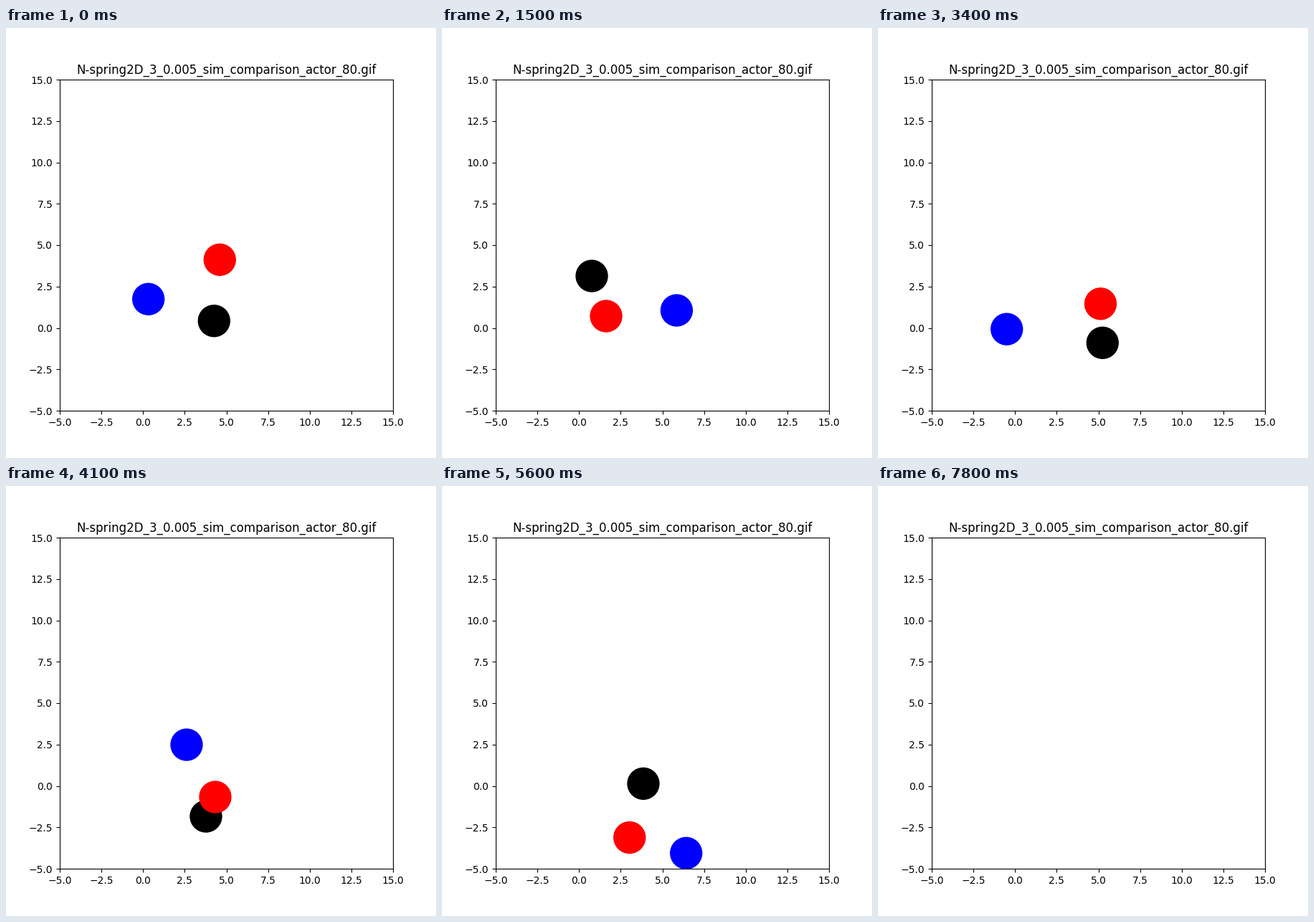
Write a matplotlib script that moves like this. It is 600 px wide and 600 px high and loops after 8 s.

```python
import numpy as np
import matplotlib.pyplot as plt
from matplotlib.animation import FuncAnimation

FRAMES, INTERVAL = 80, 100
LOW, HIGH = -5, 15
COLORS = ["blue", "black", "red"]  # back to front

# A few poses of the swing: step, then x, y of each ball in stage pixels.
POSES = np.array([
    (0, 198.7, 378.3, 290.3, 408.7, 298.3, 323.3),
    (8, 274.2, 379, 238.4, 388, 254.3, 353.8),
    (15, 327.4, 394, 209, 346, 229, 402),
    (22, 273.3, 409, 246.8, 350.3, 246.8, 412.8),
    (34, 179.7, 420.2, 313.3, 439.3, 310.5, 384.8),
    (41, 252, 361, 279, 461, 292, 434),
    (48, 333.5, 376, 238.5, 440.3, 258, 479.8),
    (54, 350.4, 472, 264, 412.6, 251, 494.4),
    (64, 240, 620, 359.8, 481, 350.5, 459.5),
    (72, 110, 557, 425, 575, 449.4, 480.6),
    (78, 90, 562, 455, 670, 535, 562),
])


def basis(t, knots):
    """Cubic spline basis: one cubic plus a bend at each inner knot."""
    powers = [t ** n for n in range(4)]
    bends = [np.maximum(t - k, 0) ** 3 for k in knots]
    return np.column_stack(powers + bends)


def swing(poses):
    """Smooth path through the poses, as (step, ball, xy) in axes units."""
    keys = poses[:, 0] / FRAMES
    steps = np.arange(FRAMES) / FRAMES
    weights = np.linalg.solve(basis(keys, keys[2:-2]), poses[:, 1:])
    px = (basis(steps, keys[2:-2]) @ weights).reshape(FRAMES, -1, 2)
    return LOW + (px - (75, 534)) * (HIGH - LOW) / (465, -462)


paths = swing(POSES)

fig, ax = plt.subplots(figsize=(6, 6), dpi=100)
balls = ax.scatter(*paths[0].T, s=1000, c=COLORS, linewidths=1)
ax.set(xlim=(LOW, HIGH), ylim=(LOW, HIGH),
       title="N-spring2D_3_0.005_sim_comparison_actor_80.gif")


def update(i):
    balls.set_offsets(paths[i])
    return balls,


anim = FuncAnimation(fig, update, frames=FRAMES, interval=INTERVAL,
                     repeat=True, repeat_delay=0)
plt.show()
```
